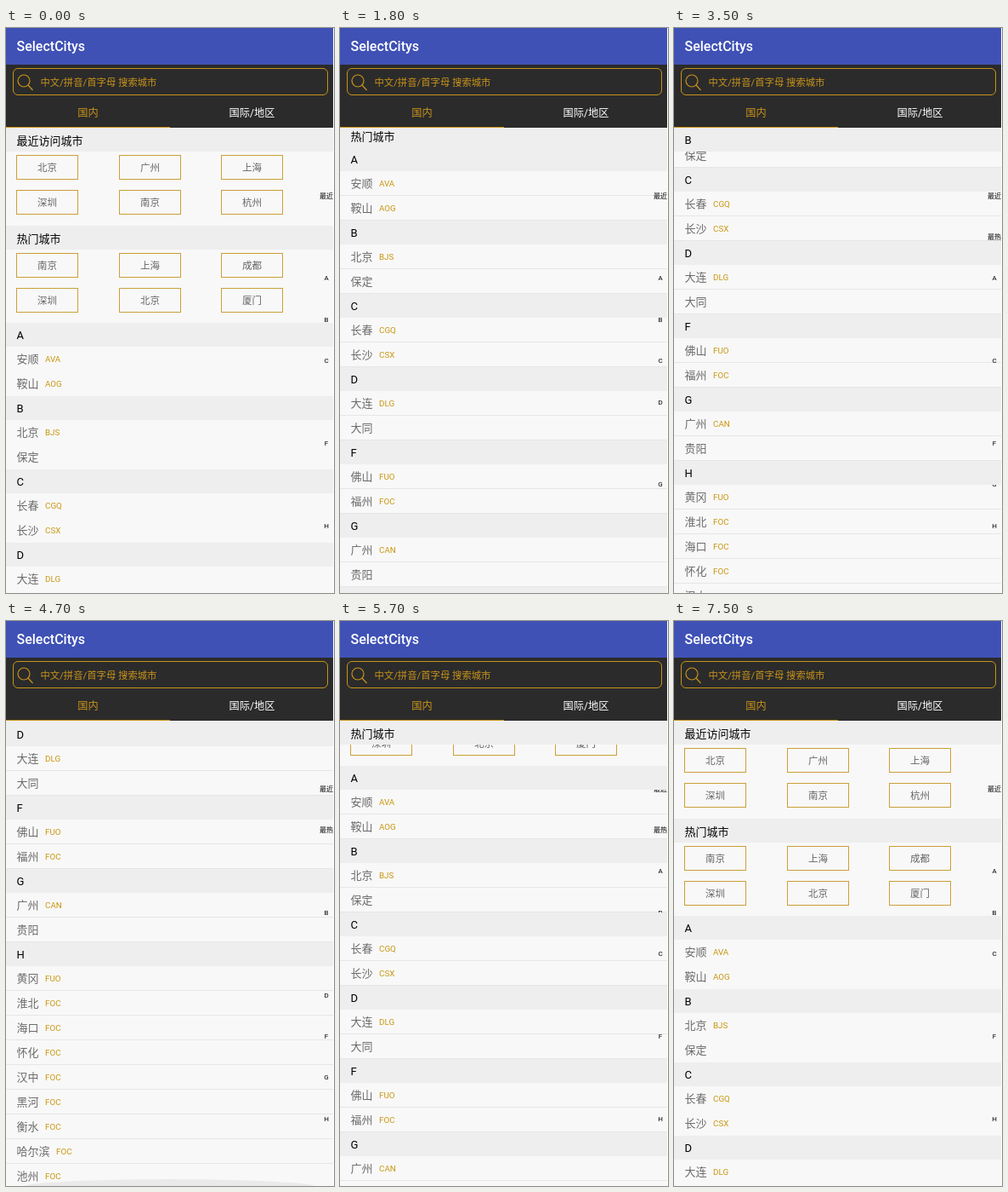
Write an HTML page that moves like this. It is 386 px wide and 663 px high and loops after 8 s.

```html
<!DOCTYPE html>
<html lang="zh-CN">
<head>
<meta charset="utf-8">
<title>SelectCitys</title>
<style>
  * { box-sizing: border-box; }
  html, body { margin: 0; width: 100%; height: 100%; overflow: hidden; background: #fff; }
  body { font-family: Roboto, "Noto Sans CJK SC", sans-serif; }
  #app { position: relative; width: 385px; height: 663px; overflow: hidden; background: #2b2b2b; white-space: nowrap; --gold: #c8931a; }
  #bar { height: 43px; padding-left: 12.5px; background: #3f51b5; color: #fff; font-size: 16px; font-weight: 500; line-height: 43px; }
  #search { position: absolute; left: 8px; top: 47px; width: 371px; height: 32px; border: 1px solid var(--gold); border-radius: 6px; color: var(--gold); font-size: 11.35px; line-height: 32px; padding-left: 31.5px; }
  #search svg { position: absolute; left: 4px; top: 5px; fill: none; stroke: var(--gold); stroke-width: 1.2; }
  .tab { position: absolute; top: 84px; width: 193px; height: 33px; line-height: 33px; text-align: center; color: #fff; font-size: 12.2px; }
  .tab.on { color: var(--gold); border-bottom: 1.5px solid var(--gold); }
  .tab + .tab { left: 193px; }
  #view { position: absolute; left: 0; top: 117px; width: 385px; height: 546px; overflow: hidden; background: #f8f8f8; }
  #list { height: 100%; overflow: hidden; }
  h2 { position: sticky; top: 0; z-index: 1; margin: 0; height: 28px; padding-left: 12.5px; background: #eee; color: #000; font-size: 13px; font-weight: 400; line-height: 29px; }
  h2.wide { line-height: 31px; }
  .grid { position: relative; height: 86px; }
  .grid span { position: absolute; width: 73px; height: 29px; border: 1px solid #cba03a; color: #666; font-size: 11.5px; line-height: 29px; text-align: center; }
  .row { display: flex; height: 29px; padding-left: 12.5px; border-bottom: 1px solid #e6e6e6; color: #6b6b6b; font-size: 13px; line-height: 30px; }
  .row i { margin-left: 7.5px; color: #c8960f; font-size: 9.8px; font-style: normal; }
  .plain .row { border-color: transparent; }
  #index span { position: absolute; left: 367px; width: 20px; height: 12px; line-height: 12px; text-align: center; color: #000; font-size: 8px; }
  .glow { position: absolute; left: 20px; width: 345px; height: 18px; border-radius: 50%; background: rgba(0, 0, 0, .055); opacity: 0; }
  #low { bottom: -10px; }
  #high { top: -9px; }
</style>
</head>
<body>
<div id="app">
  <div id="bar">SelectCitys</div>
  <div id="search">
    <svg width="20" height="22"><circle cx="8" cy="9" r="7"/><path d="M13 14l5.5 6"/></svg>中文/拼音/首字母 搜索城市
  </div>
  <div class="tab on">国内</div>
  <div class="tab">国际/地区</div>
  <div id="view">
    <div id="list"></div>
    <div id="low" class="glow"></div>
    <div id="high" class="glow"></div>
  </div>
  <div id="index"></div>
</div>
<script>
const $ = id => document.getElementById(id);
const list = $('list'), low = $('low'), high = $('high');

const grid = (title, names, height) =>
  `<section><h2 class="wide">${title}</h2><div class="grid" style="height:${height}px">` +
  names.split(' ').map((name, i) =>
    `<span style="left:${12 + Math.round(i % 3 * 120.7)}px;top:${4 + 41 * Math.floor(i / 3)}px">${name}</span>`
  ).join('') + '</div></section>';

const cities = {
  A: '安顺 AVA,鞍山 AOG',
  B: '北京 BJS,保定',
  C: '长春 CGQ,长沙 CSX',
  D: '大连 DLG,大同',
  F: '佛山 FUO,福州 FOC',
  G: '广州 CAN,贵阳',
  H: '黄冈 FUO,淮北 FOC,海口 FOC,怀化 FOC,汉中 FOC,黑河 FOC,衡水 FOC,哈尔滨 FOC,池州 FOC'
};

const row = entry => {
  const [name, code = ''] = entry.split(' ');
  return `<div class="row">${name}<i>${code}</i></div>`;
};

list.innerHTML =
  grid('最近访问城市', '北京 广州 上海 深圳 南京 杭州', 87) +
  grid('热门城市', '南京 上海 成都 深圳 北京 厦门', 86) +
  Object.entries(cities).map(([letter, names]) =>
    `<section><h2>${letter}</h2>${names.split(',').map(row).join('')}</section>`).join('');

$('index').innerHTML = ['最近', '最热', ...Object.keys(cities)].map((label, i) =>
  `<span style="top:${191.5 + i * 48.4}px">${label}</span>`).join('');

// Each swipe: start time, then scroll offsets 100 ms apart; the last one holds.
const LOOP = 8000, STEP = 100;
const swipes = [
  [0, 0], [500, 3], [1100, 100], [1400, 165], [1800, 206],
  [2300, 222, 258, 290, 312, 326, 333],
  [3500, 354, 410, 460, 485],
  [5200, 465, 405, 332, 266, 214, 176, 150, 138],
  [6400, 106, 62, 26, 8, 0]
];

function offsetAt(t) {
  const [start, ...steps] = swipes.filter(s => s[0] <= t).pop();
  return steps[Math.min(Math.floor((t - start) / STEP), steps.length - 1)];
}

function draw(now) {
  const t = Math.floor(now % LOOP / STEP) * STEP;
  const y = offsetAt(t);
  list.scrollTop = y;
  list.classList.toggle('plain', y < 100);
  low.style.opacity = t >= 3800 && t < 5200 ? 1 : 0;
  high.style.opacity = t >= 6800 && t < 7500 ? (7500 - t) / 700 : 0;
  high.style.transform = `scaleY(${Math.max(.1, (7300 - t) / 500)})`;
  requestAnimationFrame(draw);
}
draw(performance.now());
</script>
</body>
</html>
```
